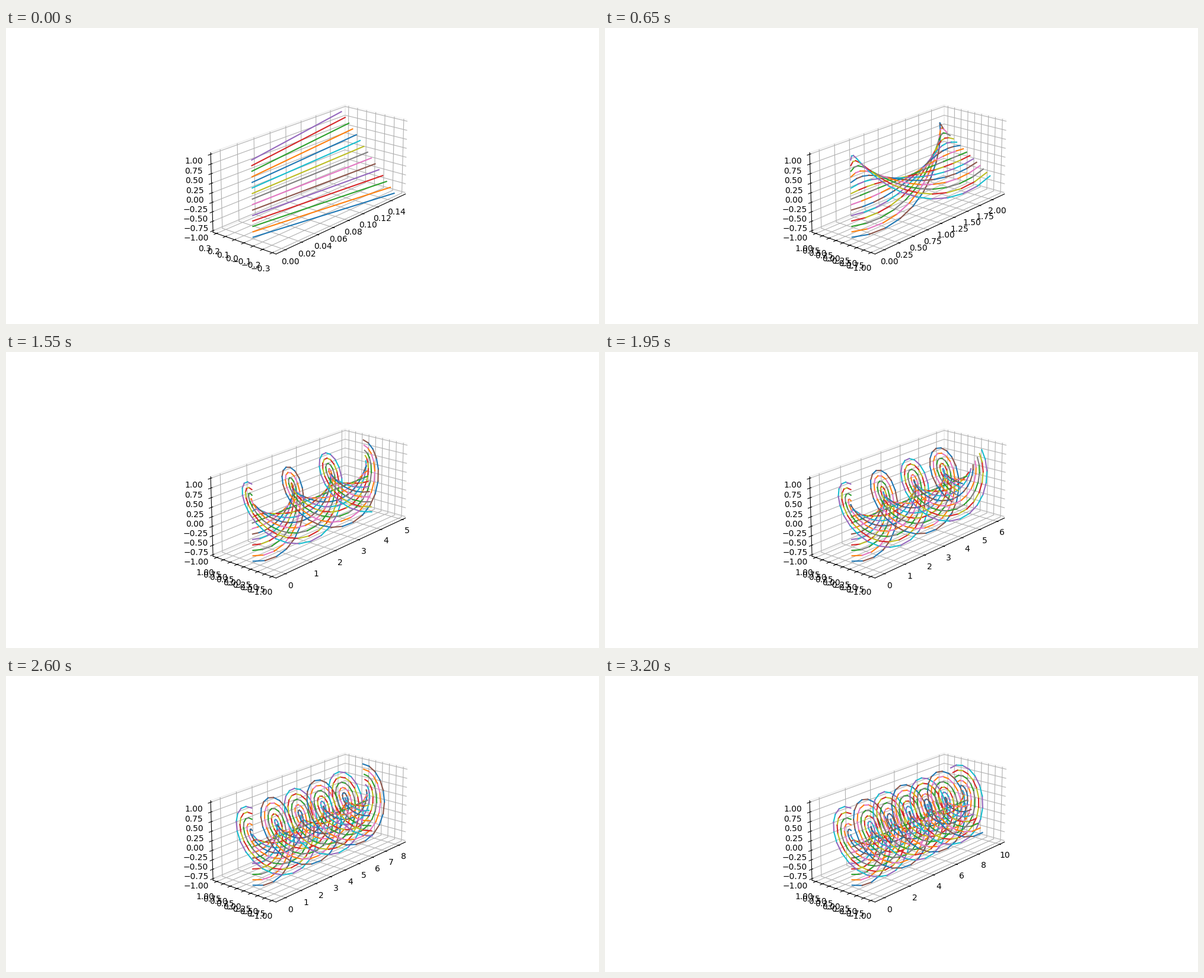
Recreate the animation shown at these times as a matplotlib script. Size 1000 px wide and 500 px high, loop 3250 ms.

```python
import numpy as np
import matplotlib.pyplot as plt
from matplotlib.animation import FuncAnimation
from matplotlib.ticker import AutoLocator
from mpl_toolkits.mplot3d.art3d import Line3DCollection

FRAMES = 65
STRANDS = 15
DT = 0.15
PAD = 1 / 48  # gap between the axis range and the box walls


class InnerLocator(AutoLocator):
    """Automatic ticks that stay out of the gap next to the walls."""

    def __call__(self):
        lo, hi = self.axis.get_view_interval()
        gap = (hi - lo) * PAD / (1 + 2 * PAD)
        lo, hi = np.round([lo + gap, hi - gap], 9)
        ticks = self.tick_values(lo, hi)
        return ticks[(ticks >= lo - 1e-9) & (ticks <= hi + 1e-9)]


def padded(lo, hi, margin=0.0):
    lo, hi = lo - margin * (hi - lo), hi + margin * (hi - lo)
    gap = (hi - lo) * PAD
    return lo - gap, hi + gap


# Each strand is a helix r * (sin 2t, cos 2t) running along x = t.
t = DT * np.arange(FRAMES + 1)[:, None]
r = np.linspace(-1, 1, STRANDS)
points = np.stack([t + 0 * r, r * np.sin(2 * t), r * np.cos(2 * t)], axis=-1)
segments = np.stack([points[:-1], points[1:]], axis=2).reshape(-1, 2, 3)
reach = np.maximum.accumulate(np.abs(np.sin(2 * t[:, 0])))

fig = plt.figure(figsize=(10, 5), dpi=100)
ax = fig.add_subplot(projection="3d")
ax.set_box_aspect((5, 2, 2))
ax.view_init(elev=20, azim=-140)

for axis, shade in ((ax.xaxis, 0.9625), (ax.yaxis, 0.925), (ax.zaxis, 0.944)):
    axis.set_major_locator(InnerLocator())
    axis.pane.set_alpha(1)
    axis.pane.set_edgecolor((shade, shade, shade))
    axis.pane.set_fill(False)

strands = Line3DCollection(segments[:STRANDS], linewidths=1.5,
                           colors=[f"C{i}" for i in range(10)],
                           capstyle="projecting")
ax.add_collection3d(strands)
ax.set_zlim(*padded(-1, 1))


def draw(n):
    strands.set_segments(segments[:(n + 1) * STRANDS])
    ax.set_xlim(*padded(0, t[n + 1, 0], 0.05))
    ax.set_ylim(*padded(-reach[n + 1], reach[n + 1], 0.05))
    return [strands]


anim = FuncAnimation(fig, draw, frames=FRAMES, interval=50,
                     init_func=lambda: draw(0), repeat=True, repeat_delay=0)
plt.show()
```
